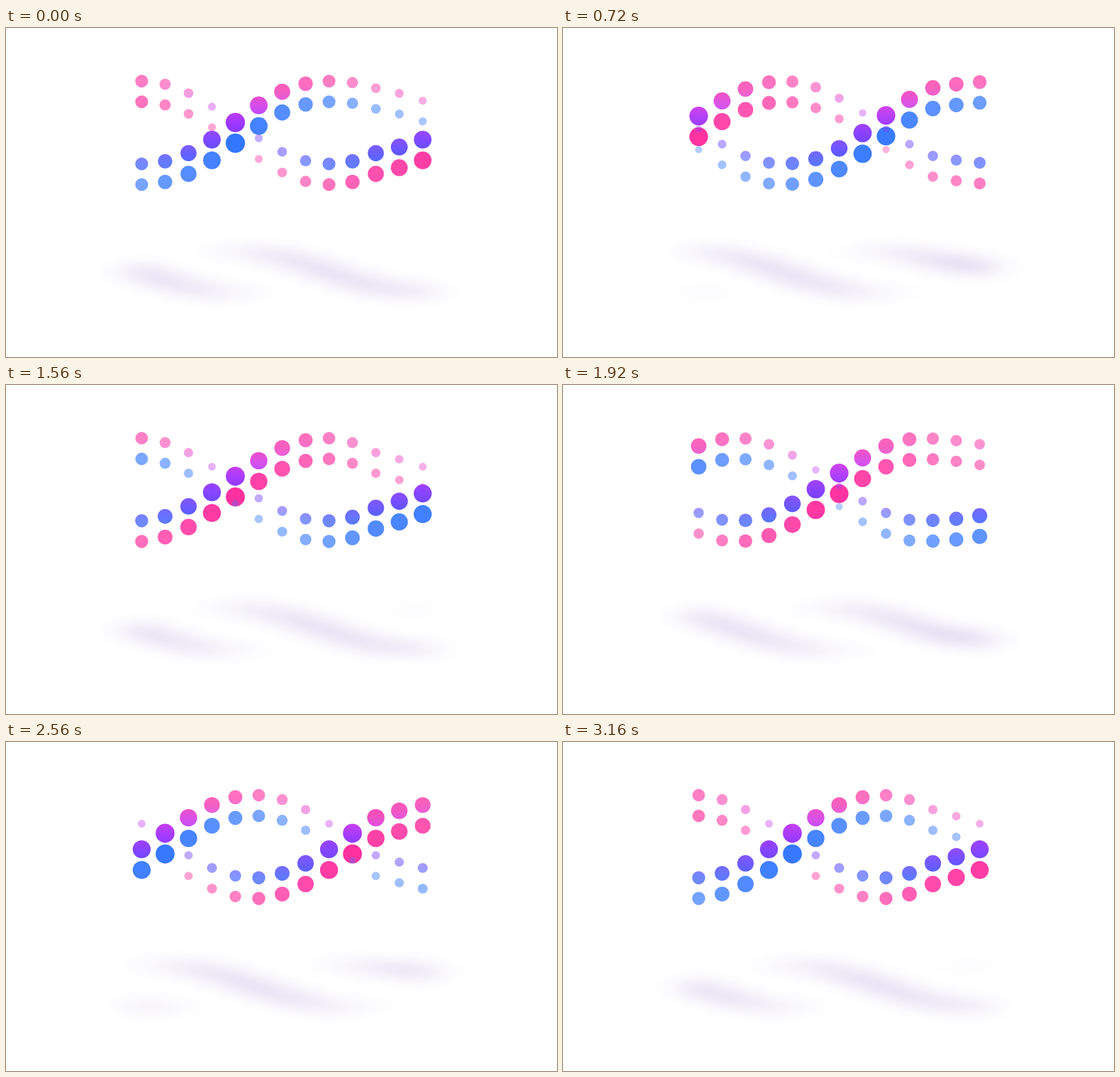
An HTML page with a canvas that plays this animation: 800x477 px, repeating every 3.2 s.

```html
<!DOCTYPE html>
<html lang="en">
<head>
<meta charset="utf-8">
<title>Dotted helix</title>
<style>
  html, body { margin: 0; width: 100%; height: 100%; overflow: hidden; background: #fff; }
  canvas { display: block; }
</style>
</head>
<body>
<canvas id="stage" width="800" height="477"></canvas>
<script>
const ctx = document.getElementById('stage').getContext('2d');

const LOOP = 3200, HALF = LOOP / 2, STEP = 40;
const COLUMNS = 13, FIRST_X = 197, GAP = 34;
const TOP = 77, SWING = 120, PAIR_GAP = 30, RADIUS = 14;
const STRANDS = [
  { color: '#ff2d9d', lead: LOOP },
  { color: '#3377ff', lead: HALF }
];
const UPPER_STOPS = [
  [77, '#ff3ca5'], [92, '#f03cb6'], [112, '#d33de9'], [137, '#a038ff'],
  [162, '#7339ff'], [182, '#493fff'], [197, '#2d50ff']
];

const sine = x => (1 - Math.cos(Math.PI * x)) / 2;

// Symmetric cubic-bezier(a, 0, 1 - a, 1), solved by bisection.
function bezier(a, x) {
  let low = 0, high = 1, u = 0.5;
  for (let i = 0; i < 24; i++) {
    u = (low + high) / 2;
    const at = 3 * a * u * (1 - u) ** 2 + 3 * (1 - a) * u * u * (1 - u) + u ** 3;
    if (at < x) low = u; else high = u;
  }
  return u * u * (3 - 2 * u);
}

function dotAt(column, strand, time) {
  const delay = 200 * column - 100 * Math.max(0, column - 10);
  const since = time - delay + strand.lead;
  const phase = ((since % LOOP) + LOOP) % LOOP / HALF;
  const falling = phase < 1;
  const part = falling ? phase : phase - 1;

  let eased = sine(part);
  if (since < 0) eased = bezier(0.58, part);
  else if (since < LOOP && falling) eased = bezier(0.42, part);

  const nearness = (1 - Math.abs(2 * part - 1)) * (falling ? 1 : -1);
  return {
    column,
    x: FIRST_X + GAP * column,
    y: TOP + SWING * (falling ? eased : 1 - eased),
    depth: Math.sin(Math.PI * phase),
    scale: (2 + nearness) / 3,
    color: strand.color
  };
}

function drawDot(dot, y, fill) {
  ctx.globalAlpha = dot.scale;
  ctx.fillStyle = fill;
  ctx.beginPath();
  ctx.arc(dot.x, y, RADIUS * dot.scale, 0, 2 * Math.PI);
  ctx.fill();
}

function upperFill(dot) {
  // The last columns keep their pink a little longer.
  const shift = dot.column < 10 ? 0 : 22 * Math.exp(-(((dot.y - 124) / 22) ** 2));
  const fill = ctx.createLinearGradient(0, TOP + shift, 0, TOP + SWING + shift);
  UPPER_STOPS.forEach(([y, color]) => fill.addColorStop((y - TOP) / SWING, color));
  return fill;
}

const shadowFill = ctx.createRadialGradient(0, 0, 0, 0, 0, 3);
for (let i = 0; i <= 12; i++) {
  const distance = i / 4;
  const alpha = i === 12 ? 0 : Math.exp(-distance * distance / 2);
  shadowFill.addColorStop(i / 12, `rgba(80, 40, 170, ${alpha})`);
}

// Dots close to the floor cast the strongest shadow.
function drawShadow(dot) {
  ctx.save();
  ctx.translate(dot.x, 354 + 31 * dot.depth);
  ctx.scale(27, 11.5);
  ctx.globalAlpha = 0.082 * ((dot.y - TOP) / SWING) ** 2;
  ctx.fillStyle = shadowFill;
  ctx.fillRect(-3, -3, 6, 6);
  ctx.restore();
}

function render(time) {
  const dots = STRANDS.flatMap(strand =>
    Array.from({ length: COLUMNS }, (_, column) => dotAt(column, strand, time)));
  ctx.globalAlpha = 1;
  ctx.fillStyle = '#fff';
  ctx.fillRect(0, 0, 800, 477);
  dots.forEach(drawShadow);
  dots.forEach(dot => drawDot(dot, dot.y + PAIR_GAP, dot.color));
  dots.forEach(dot => drawDot(dot, dot.y, upperFill(dot)));
}

const start = performance.now();
function tick() {
  const elapsed = Math.max(0, performance.now() - start) % LOOP;
  render(Math.floor(elapsed / STEP) * STEP);
  requestAnimationFrame(tick);
}
tick();
</script>
</body>
</html>
```
